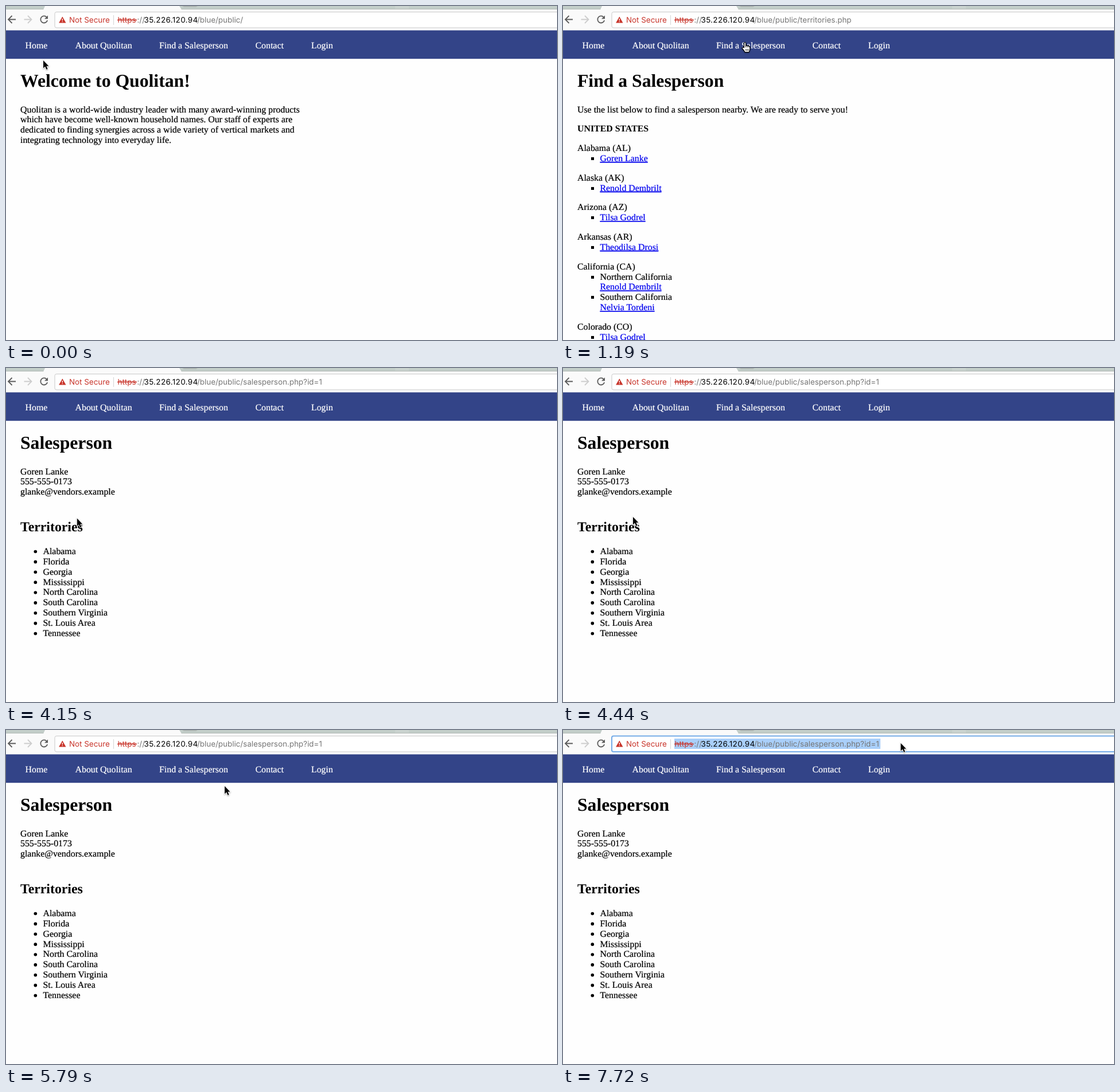
Write an HTML page that moves like this. It is 960x583 px and loops after 8 s.

```html
<!DOCTYPE html>
<html lang="en">
<head>
<meta charset="utf-8">
<title>Salesperson site</title>
<style>
  html, body { margin: 0; width: 100%; height: 100%; overflow: hidden; background: #fefefe; }
  svg { display: block; width: 960px; height: 583px; }
  text { font: 15.86px "Liberation Serif", serif; white-space: pre; text-rendering: geometricPrecision; stroke: #000; stroke-width: .22px; }
  .h1 { font-size: 31.7px; font-weight: bold; stroke: none; }
  .h2 { font-size: 23.8px; font-weight: bold; stroke: none; }
  .b { font-weight: bold; stroke: none; }
  .link { fill: #0000ee; stroke: #0000ee; text-decoration: underline; }
  .nav { fill: #fff; stroke: #fff; }
  .ui { font: 13.4px Inter, sans-serif; stroke: none; }
  .host { letter-spacing: .38px; }
  .red { fill: #c8342a; }
  .grey { fill: #757575; }
  .cursor { filter: drop-shadow(0 1px 1px rgba(0, 0, 0, .35)); }
</style>
</head>
<body>
<svg viewBox="0 0 960 583">
  <rect width="960" height="583" fill="#fefefe"/>

  <g id="chrome">
    <rect width="960" height="6" fill="#c3cec9"/>
    <rect x="678" width="24" height="5" fill="#cad3cf"/>
    <path d="M0 5.5H960" stroke="#b0b8b4"/>
    <path d="M307 0H334L331 2H310Z" fill="#b0b8b4"/>
    <path d="M65 6.5L68 0H302L306 6.5Z" fill="#fafafa"/>
    <rect y="6" width="960" height="37" fill="#fafafa"/>
    <rect id="box" x="85" y="10.5" width="890" height="27.5" rx="3" fill="#fff" stroke="#cacaca"/>
    <rect id="mark" x="194" y="15" width="359" height="18" fill="#a9cffa"/>
    <g fill="none" stroke="#5c5c5c" stroke-width="1.8" transform="translate(-.5 -.5)">
      <path d="M17.5 24H5M11 17.5L4.5 24L11 30.5"/>
      <path d="M32 24H44.5M38.5 17.5L45 24L38.5 30.5" stroke="#cdcdcd"/>
      <path d="M71.3 20A6 6 0 1 0 72.600 25.5"/>
      <path d="M73.5 17V23H67.5Z" fill="#5c5c5c" stroke="none"/>
    </g>
    <path d="M98.3 18.5L104.5 29.5H92.1Z" fill="#c8342a"/>
    <path d="M98.3 22V25.5M98.3 26.7V28" stroke="#fff" stroke-width="1.3"/>
    <path d="M187.5 16V33" stroke="#d4d4d4"/>
    <text class="ui red" x="110" y="29">Not Secure</text>
    <text class="ui red" x="194.5" y="29">https</text>
    <path d="M194 24.5H228" stroke="#c8342a" stroke-width="1.3"/>
    <text class="ui grey" x="228.5" y="29">://</text>
    <text class="ui host" x="240.5" y="29">35.226.120.94</text>
    <text class="ui grey" id="path" x="333" y="29"></text>
  </g>

  <g id="nav"><rect y="42.5" width="960" height="49.7" fill="#334488"/></g>
  <g id="pages"></g>

  <g class="cursor" id="arrow">
    <path d="M0 0V13.4L3.1 10.6L5.4 15.8L7.6 14.9L5.4 9.8H9.4Z"
      stroke="#fff" stroke-width="1.6" paint-order="stroke"/>
  </g>
  <g class="cursor" id="hand">
    <path d="M-1.5 9V1.5Q-1.5 0 0 0T1.5 1.5V6Q3 4.6 4.2 6.2Q5.8 5.2 6.8 7Q8.8 6.5 8.8 9V11.5
      Q8.5 14 7 17.2H0Q-1 14.5 -4.6 11Q-5.2 8.5 -3.2 8.6Z" fill="#fff" stroke="#000" stroke-width="1.2"/>
    <path d="M1.5 6V9M4.2 6.5V9M6.8 7.5V9M1.6 11.5V15M3.8 11.5V15M6 11.5V15" stroke="#000" stroke-width=".8"/>
  </g>
  <g id="beam" fill="none">
    <path d="M-3.5 -8Q0 -8 0 -6Q0 -8 3.5 -8M0 -6V6M-3.5 8Q0 8 0 6Q0 8 3.5 8M-2 3H2" stroke="#fff" stroke-width="3"/>
    <path d="M-3.5 -8Q0 -8 0 -6Q0 -8 3.5 -8M0 -6V6M-3.5 8Q0 8 0 6Q0 8 3.5 8M-2 3H2" stroke="#000" stroke-width="1.3"/>
  </g>
</svg>

<script>
const LOOP = 8000, LINE = 17.88, GAP = 33.75, LEFT = 25, INDENT = 64.5, TOP = 185.6;
const $ = id => document.getElementById(id);

function add(parent, tag, attrs, content = "") {
  const el = document.createElementNS("http://www.w3.org/2000/svg", tag);
  for (const key in attrs) el.setAttribute(key, attrs[key]);
  el.textContent = content;
  return parent.appendChild(el);
}
const write = (g, x, y, s, cls = "") => add(g, "text", { x, y, class: cls }, s);

[["Home", 33.6], ["About Quolitan", 120.5], ["Find a Salesperson", 267], ["Contact", 434.5], ["Login", 531.7]]
  .forEach(([label, x]) => write($("nav"), x, 73.7, label, "nav"));

function page(title) {
  const g = add($("pages"), "g", {});
  write(g, LEFT, 141.4, title, "h1");
  return g;
}
const lines = (g, list) => list.forEach((s, i) => write(g, LEFT, TOP + i * LINE, s));

const home = page("Welcome to Quolitan!");
lines(home, [
  "Quolitan is a world-wide industry leader with many award-winning products",
  "which have become well-known household names. Our staff of experts are",
  "dedicated to finding synergies across a wide variety of vertical markets and",
  "integrating technology into everyday life."
]);

const finder = page("Find a Salesperson");
lines(finder, ["Use the list below to find a salesperson nearby. We are ready to serve you!"]);
write(finder, LEFT, TOP + GAP, "UNITED STATES", "b");
let y = TOP + GAP;
const states = [
  ["Alabama (AL)", ["Goren Lanke"]],
  ["Alaska (AK)", ["Renold Dembrilt"]],
  ["Arizona (AZ)", ["Tilsa Godrel"]],
  ["Arkansas (AR)", ["Theodilsa Drosi"]],
  ["California (CA)", ["Renold Dembrilt", "Northern California"], ["Nelvia Tordeni", "Southern California"]],
  ["Colorado (CO)", ["Tilsa Godrel"]]
];
for (const [state, ...areas] of states) {
  write(finder, LEFT, y += GAP, state);
  for (const [name, area] of areas) {
    y += LINE;
    add(finder, "rect", { x: 49, y: Math.round(y - 7), width: 5, height: 5 });
    if (area) {
      write(finder, INDENT, y, area);
      y += LINE;
    }
    write(finder, INDENT, y, name, "link");
  }
}

const person = page("Salesperson");
lines(person, ["Goren Lanke", "555-555-0173", "glanke@vendors.example"]);
write(person, LEFT, 284.6, "Territories", "h2");
["Alabama", "Florida", "Georgia", "Mississippi", "North Carolina", "South Carolina",
  "Southern Virginia", "St. Louis Area", "Tennessee"].forEach((s, i) => {
  const base = 324.9 + i * LINE;
  add(person, "circle", { cx: 51.3, cy: base - 4.4, r: 2.8 });
  write(person, INDENT, base, s);
});

const views = [
  { at: 0, el: home, path: "/blue/public/" },
  { at: 1190, el: finder, path: "/blue/public/territories.php" },
  { at: 4150, el: person, path: "/blue/public/salesperson.php?id=1" }
];

// Pointer moves: first step, last step, number of steps, way points.
const moves = [
  [150, 890, 6, [65, 95], [330, 66], [547, 61], [317, 63.5]],
  [1780, 2500, 6, [317, 63.5], [124.5, 262.5]],
  [3400, 3400, 1, [124.5, 262.5], [124.5, 263.5]],
  [4150, 4440, 3, [124.5, 263.5], [122, 260]],
  [4890, 5790, 7, [122, 260], [381, 98]],
  [5940, 6090, 2, [381, 98], [482, 30]],
  [6390, 7130, 6, [482, 30], [560, 22], [594, 23], [589, 25]],
  [7720, 7720, 1, [589, 25], [588.5, 23]]
];

function along(points, u) {
  const s = u * (points.length - 1), i = Math.min(Math.floor(s), points.length - 2), f = s - i;
  return points[i].map((v, k) => v + (points[i + 1][k] - v) * f);
}

function pointer(t) {
  const [from, to, count, ...points] = moves.filter(m => m[0] <= t).pop() || [0, 0, 1, [65, 95], [65, 95]];
  const gap = (to - from) / (count - 1) || 1;
  const step = Math.min(count, Math.floor((t - from) / gap + 0.01) + 1);
  const u = step / count;
  return along(points, points.length > 2 ? u : u * u * (3 - 2 * u));
}

function kindAt(x, y, view, t) {
  if (t >= 7720) return "arrow";
  if (y < 42) return "beam";
  const onLink = view.el === finder && x > 64 && x < 148 && y > 257 && y < 276;
  return y < 92 || onLink ? "hand" : "arrow";
}

function draw(t) {
  const view = views.filter(v => v.at <= t).pop();
  for (const v of views) v.el.style.display = v === view ? "" : "none";
  $("path").textContent = view.path;

  const focused = t >= 7570;
  $("mark").style.display = focused ? "" : "none";
  $("box").setAttribute("stroke", focused ? "#76ace8" : "#cacaca");
  $("box").setAttribute("stroke-width", focused ? 2 : 1);

  const [x, y] = pointer(t), kind = kindAt(x, y, view, t);
  for (const id of ["arrow", "hand", "beam"]) $(id).style.display = id === kind ? "" : "none";
  $(kind).setAttribute("transform", `translate(${x} ${y})`);
}

const start = performance.now();
function tick() {
  draw((performance.now() - start) % LOOP);
  requestAnimationFrame(tick);
}
tick();
</script>
</body>
</html>
```
